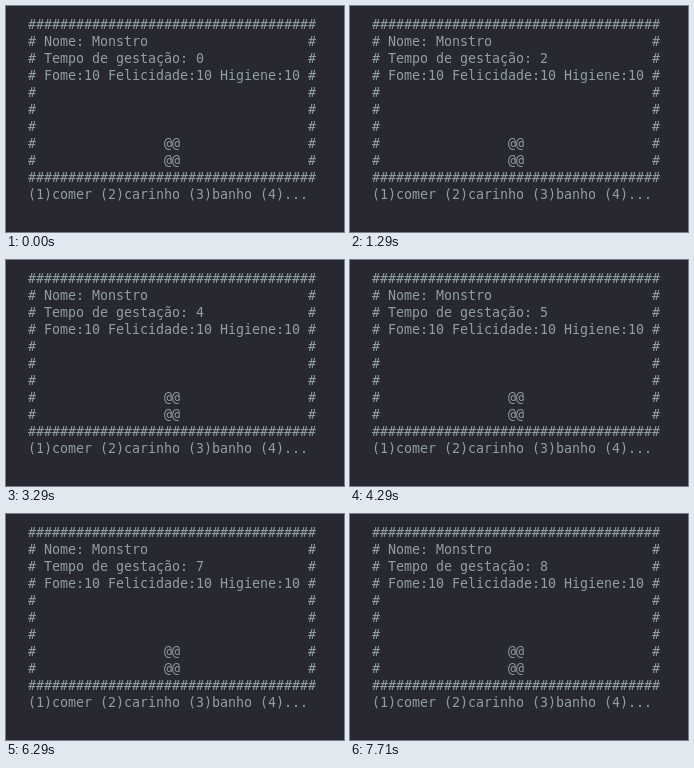
Recreate the animation shown at these times as an HTML page with a canvas. Size 338x226 px, loop 8000 ms.

```html
<!DOCTYPE html>
<html lang="pt">
<head>
<meta charset="utf-8">
<style>
  html, body { margin: 0; width: 100%; height: 100%; overflow: hidden; background: #282833; }
  canvas { display: block; }
</style>
</head>
<body>
<canvas id="screen" width="338" height="226"></canvas>
<script>
const ctx = document.getElementById('screen').getContext('2d', { alpha: false });
const LOOP = 8000;
const CELL = { w: 8, h: 17 };
const ORIGIN = { x: 22, y: 23 };
const COLS = 36;
const BORDER = '#'.repeat(COLS);

const boxed = text => '# ' + text.padEnd(COLS - 3) + '#';

function counterAt(t) {
  if (t < 140) return 0;
  return t < 1290 ? 1 : 2 + Math.floor((t - 1290) / 1000);
}

function screenLines(age) {
  const egg = ' '.repeat(15) + '@@';
  return [
    BORDER,
    boxed('Nome: Monstro'),
    boxed('Tempo de gestação: ' + age),
    boxed('Fome:10 Felicidade:10 Higiene:10'),
    boxed(''), boxed(''), boxed(''),
    boxed(egg), boxed(egg),
    BORDER,
    '(1)comer (2)carinho (3)banho (4)...'
  ];
}

function draw(age) {
  ctx.fillStyle = '#282833';
  ctx.fillRect(0, 0, 338, 226);
  ctx.fillStyle = '#8f9ea1';
  ctx.font = '13.333px "DejaVu Sans Mono", monospace';
  ctx.textBaseline = 'alphabetic';
  screenLines(age).forEach((line, row) => {
    [...line].forEach((char, col) => {
      ctx.fillText(char, ORIGIN.x + col * CELL.w, ORIGIN.y + row * CELL.h);
    });
  });
}

const start = performance.now();
function frame() {
  draw(counterAt((performance.now() - start) % LOOP));
  requestAnimationFrame(frame);
}
frame();
</script>
</body>
</html>
```
